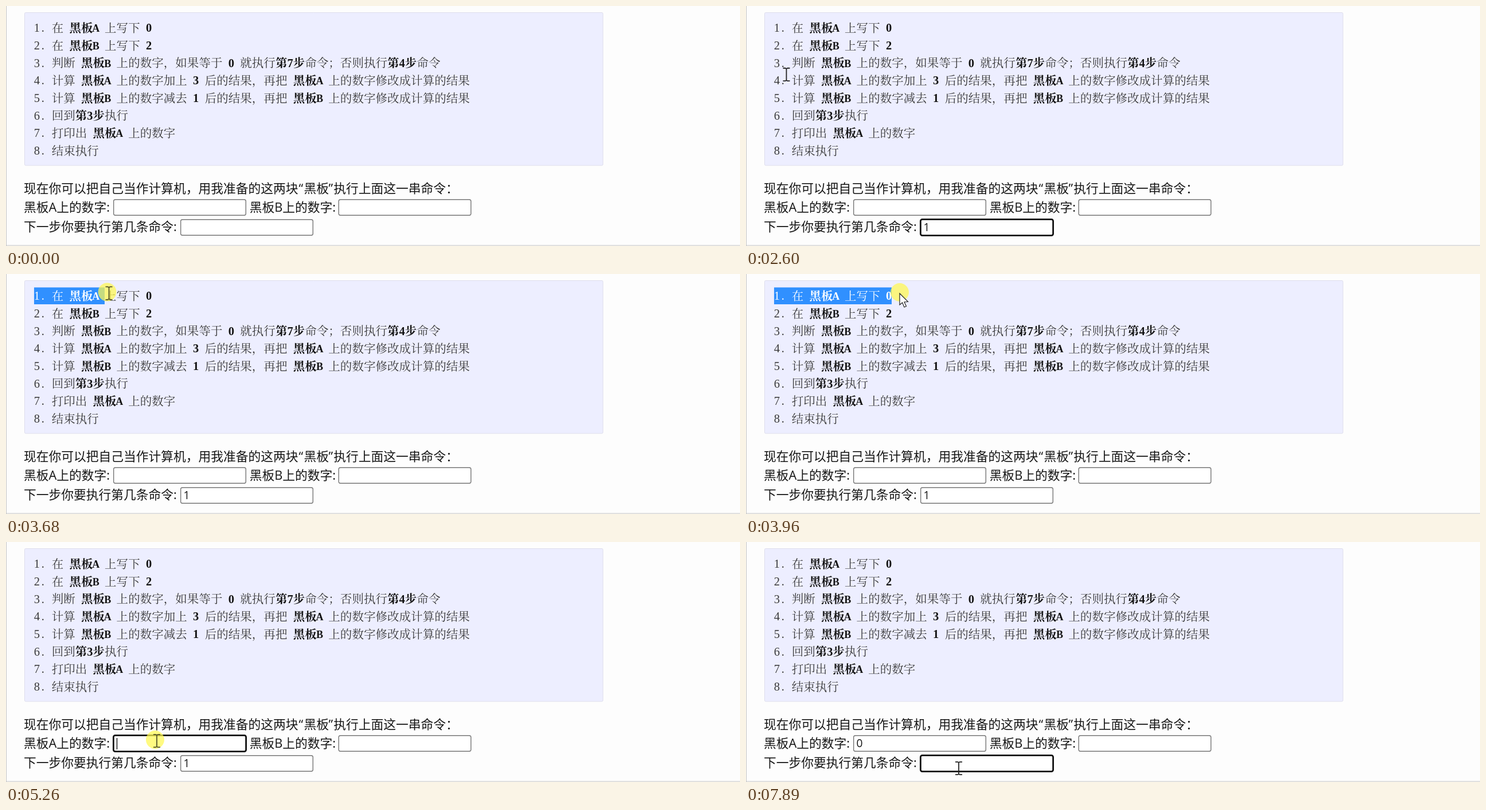
Animation of 1280x420 px, one loop 8000 ms. Source, as an HTML page with a canvas:

```html
<!DOCTYPE html>
<html lang="zh-CN">
<head>
<meta charset="utf-8">
<style>
html, body { margin: 0; width: 100%; height: 100%; overflow: hidden; background: #fdfdfd; }
canvas { display: block; }
</style>
</head>
<body>
<canvas id="stage" width="1280" height="420"></canvas>
<script>
const ctx = document.getElementById('stage').getContext('2d');
const LOOP = 8000, TICK = 66.8;
const CELL = 10.27, LIST_X = 48.8, LINE = 30.67;
const CJK = "'Noto Sans CJK SC', 'Noto Sans CJK', sans-serif";
const BODY = "21.75px 'Open Sans', " + CJK;

// Text between asterisks is bold.
const rows = [
  '1. 在 *黑板A* 上写下 *0*',
  '2. 在 *黑板B* 上写下 *2*',
  '3. 判断 *黑板B* 上的数字，如果等于 *0* 就执行*第7步*命令；否则执行*第4步*命令',
  '4. 计算 *黑板A* 上的数字加上 *3* 后的结果，再把 *黑板A* 上的数字修改成计算的结果',
  '5. 计算 *黑板B* 上的数字减去 *1* 后的结果，再把 *黑板B* 上的数字修改成计算的结果',
  '6. 回到*第3步*执行',
  '7. 打印出 *黑板A* 上的数字',
  '8. 结束执行'
];
const cells = ch => ch.charCodeAt(0) < 256 ? 1 : 2;
const rowEnds = rows.map(r =>
  LIST_X + CELL * [...r.replace(/\*/g, '')].reduce((n, ch) => n + cells(ch), 0));

// Outer corners of the inputs
const fields = {
  a: { x: 187, y: 338 },
  b: { x: 579.5, y: 338 },
  step: { x: 304, y: 373 }
};
const FIELD_W = 232, FIELD_H = 29;

// Pointer path: time, x, y
const path = [
  [70, 463, 413], [735, 463, 413], [1070, 429, 382], [1940, 429, 382],
  [2140, 385, 397], [2740, 24, 79], [3070, 55, 33], [3340, 55, 33],
  [3940, 268, 34], [4075, 279, 34], [4142, 284, 44], [4380, 284, 44],
  [5190, 263, 348], [5920, 263, 348], [5980, 263, 345], [6735, 263, 345],
  [6947, 355, 413], [7014, 366, 410], [7148, 371, 396], [LOOP, 371, 396]
];
const within = (t, spans) => spans.some(([a, b]) => t >= a && t < b);
const clicks = [[1210, 1410], [3140, 4170], [5250, 5390], [7210, 7350]];

function pointerAt(t) {
  const q = Math.floor(t / TICK + 0.3) * TICK;
  let i = 0;
  while (i < path.length - 2 && q >= path[i + 1][0]) i++;
  const [t0, x0, y0] = path[i], [t1, x1, y1] = path[i + 1];
  const k = Math.max(0, Math.min(1, (q - t0) / (t1 - t0)));
  const e = k * k * (3 - 2 * k);
  return { x: x0 + (x1 - x0) * e, y: y0 + (y1 - y0) * e };
}

function overText({ x, y }) {
  const row = Math.floor((y - 23) / LINE);
  if (row >= 0 && row < rows.length) return x > LIST_X && x < rowEnds[row];
  if (y > 305 && y < 334) return x > 31 && x < 780;
  if (y >= 334 && y < 370) return x > 31 && x < 811;
  return y >= 370 && y < 403 && x > 31 && x < 536;
}

function text(str, x, y, font = BODY, color = '#161616') {
  ctx.font = font;
  ctx.fillStyle = color;
  ctx.fillText(str, x, y);
}

function listRow(i, light, dark) {
  let x = LIST_X, bold = false;
  const y = 45.3 + i * LINE;
  ctx.textAlign = 'center';
  for (const ch of rows[i]) {
    if (ch === '*') { bold = !bold; continue; }
    const w = cells(ch) * CELL;
    const font = w > CELL
      ? (bold ? 700 : 300) + " 20.5px 'Noto Serif CJK SC', " + CJK
      : (bold ? 'bold ' : '') + (/[AB]/.test(ch) ? 18 : 20.5) + "px 'Liberation Serif', serif";
    text(ch, x + w / 2, y + (w > CELL ? 0.7 : 0), font, bold ? dark : light);
    x += w;
  }
  ctx.textAlign = 'left';
}

function box(x, y, w, h, r, fill, stroke, width) {
  ctx.beginPath();
  ctx.roundRect(x, y, w, h, r);
  ctx.fillStyle = fill;
  ctx.fill();
  ctx.strokeStyle = stroke;
  ctx.lineWidth = width;
  ctx.stroke();
}

function field({ x, y }, p, value, focused, caret) {
  const hover = p.x > x && p.x < x + FIELD_W && p.y > y && p.y < y + FIELD_H;
  const inset = focused ? 0.4 : 0.7;
  const stroke = focused ? '#101010' : hover ? '#4f4f4f' : '#767676';
  box(x + inset, y + inset, FIELD_W - 2 * inset, FIELD_H - 2 * inset, 3,
    '#fff', stroke, focused ? 2.8 : 1.4);
  text(value, x + 5.5, y + 21, "19.2px 'Open Sans', sans-serif");
  if (caret) {
    ctx.fillStyle = '#111';
    ctx.fillRect(x + 5.8 + (value ? 11 : 0), y + 5, 1.4, 20);
  }
}

function drawBeam(x, y, color) {
  ctx.strokeStyle = color;
  ctx.lineWidth = 1.8;
  ctx.beginPath();
  ctx.moveTo(x, y - 10);
  ctx.lineTo(x, y + 10);
  for (const s of [-1, 1]) {
    ctx.moveTo(x - 6, y + s * 11.2);
    ctx.lineTo(x - 1.8, y + s * 11.2);
    ctx.lineTo(x, y + s * 10);
    ctx.lineTo(x + 1.8, y + s * 11.2);
    ctx.lineTo(x + 6, y + s * 11.2);
  }
  ctx.stroke();
}

function drawArrow(x, y) {
  const pts = [[0, 0], [0, 20], [4.6, 16], [8, 24], [11.5, 22.5], [8, 15], [14.5, 14.5]];
  ctx.beginPath();
  pts.forEach(([dx, dy]) => ctx.lineTo(x + dx, y + dy));
  ctx.closePath();
  ctx.fillStyle = '#fff';
  ctx.fill();
  ctx.strokeStyle = '#222';
  ctx.lineWidth = 1.2;
  ctx.stroke();
}

function selectionEnd(t, p) {
  if (!within(t, [[3340, 5250]])) return LIST_X;
  if (t > 4100) return rowEnds[0];
  const snapped = LIST_X + Math.round((p.x - LIST_X - 4) / CELL) * CELL;
  return Math.min(rowEnds[0], Math.max(LIST_X, snapped));
}

function drawList(end) {
  box(32.5, 11.5, 1008.5, 267.5, 2, '#edeeff', '#dedeec', 1);
  rows.forEach((_, i) => listRow(i, '#3a3a3a', '#141414'));
  if (end <= LIST_X) return;
  ctx.save();
  ctx.beginPath();
  ctx.rect(LIST_X, 23.5, end - LIST_X, 29.5);
  ctx.clip();
  ctx.fillStyle = '#3090ff';
  ctx.fillRect(LIST_X, 23, end - LIST_X, 31);
  listRow(0, '#fff', '#fff');
  ctx.restore();
}

function drawForm(t, p) {
  text('现在你可以把自己当作计算机，用我准备的这两块', 31, 327.2);
  text('“', 510.5, 327.2);
  text('黑板', 519.5, 327.2);
  text('”', 562.5, 327.2);
  text('执行上面这一串命令：', 571.3, 327.2);
  text('黑板A上的数字:', 31, 360.2);
  text('黑板B上的数字:', 424.7, 360.2);
  text('下一步你要执行第几条命令:', 31, 394);

  const stepFocus = within(t, [[1210, 3140], [7210, LOOP]]);
  const caretA = within(t, [[5250, 5520], [6190, 6460]]);
  const caretStep = within(t, [[1210, 1410], [1940, 2470], [7210, 7890]]);
  field(fields.a, p, t >= 6460 ? '0' : '', within(t, [[5250, 7210]]), caretA);
  field(fields.b, p, '', false, false);
  field(fields.step, p, within(t, [[1940, 7420]]) ? '1' : '', stepFocus, caretStep);
}

function drawPointer(t, p) {
  if (t < 70 || within(t, [[6530, 6800]])) return;
  const beam = overText(p), pressed = within(t, clicks);
  if (pressed) {
    ctx.beginPath();
    ctx.arc(p.x - (beam ? 3 : 0), p.y - 2, 16, 0, Math.PI * 2);
    ctx.fillStyle = 'rgba(255,248,80,0.72)';
    ctx.fill();
  }
  if (beam) drawBeam(p.x, p.y, pressed ? '#55552c' : '#222');
  else drawArrow(p.x, p.y);
}

function draw(t) {
  const p = pointerAt(t);
  ctx.fillStyle = '#fdfdfd';
  ctx.fillRect(0, 0, 1280, 420);
  drawList(selectionEnd(t, p));
  drawForm(t, p);
  ctx.fillStyle = '#c4c4c4';
  ctx.fillRect(0, 0, 1, 420);
  ctx.fillRect(0, 418.5, 1280, 1);
  drawPointer(t, p);
}

const start = performance.now();
function frame() {
  draw((performance.now() - start) % LOOP);
  requestAnimationFrame(frame);
}
frame();
</script>
</body>
</html>
```
